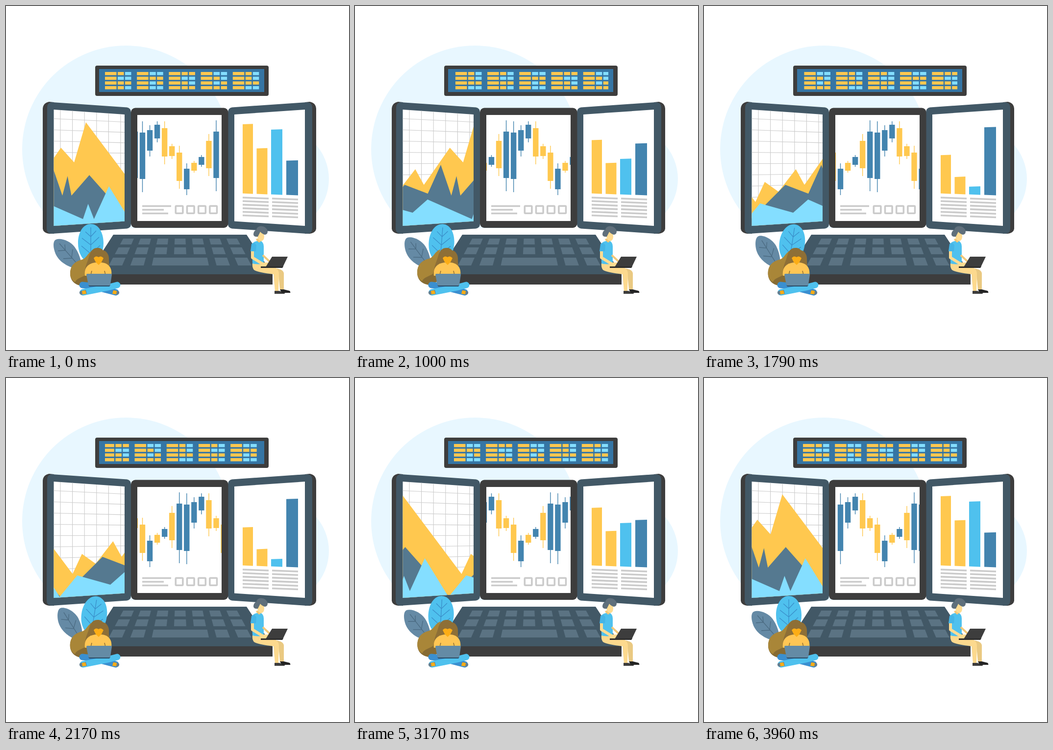
An HTML page that plays this animation: 700 by 704 pixels, repeating every 4 s.

```html
<!DOCTYPE html>
<html lang="en">
<head>
<meta charset="utf-8">
<title>Trading desk</title>
<style>
  html, body { margin: 0; width: 100%; height: 100%; overflow: hidden; background: #fff; }
  svg { display: block; width: 700px; height: 704px; }
</style>
</head>
<body>
<svg viewBox="0 0 700 704" xmlns="http://www.w3.org/2000/svg">
  <defs>
    <clipPath id="tickerClip"><rect x="202" y="130" width="315" height="46"/></clipPath>
    <clipPath id="areaClip"><path d="M97.5 212 242 222V440.5L97.5 450Z"/></clipPath>
    <clipPath id="candleClip"><rect x="268" y="223" width="172" height="217"/></clipPath>
    <clipPath id="backClip"><rect width="700" height="455"/></clipPath>
  </defs>

  <g fill="#e8f7ff" clip-path="url(#backClip)">
    <circle cx="245" cy="293" r="212"/>
    <circle cx="553" cy="354" r="106"/>
  </g>

  <!-- ticker board -->
  <rect x="182" y="122" width="354" height="62" rx="4" fill="#3d3d3d"/>
  <rect x="190" y="129" width="337" height="47" fill="#3575a4"/>
  <g clip-path="url(#tickerClip)"><g id="ticker"></g></g>

  <!-- left monitor -->
  <path d="M75 210Q76 198 88 196L98 197V466L88 466Q76 464 75 456Z" fill="#3d3d3d"/>
  <path d="M84 207Q85 196 95 197L247 207.500Q255 209 255 218V446Q255 454 247 455.500L94 466Q83 466 83 455Z" fill="#425866"/>
  <path d="M97.500 212 242 222V440.500L97.500 450Z" fill="#fff"/>
  <g clip-path="url(#areaClip)">
    <g id="grid" stroke="#cbcbcb" stroke-width="1.100"></g>
    <g id="areas"></g>
  </g>

  <!-- right monitor -->
  <path d="M633 210Q632 198 620 196L610 197V466L620 466Q632 464 633 456Z" fill="#3d3d3d"/>
  <path d="M625 207Q624 196 613 197L461 207.500Q453 209 453 218V446Q453 454 461 455.500L614 466Q625 466 625 455Z" fill="#425866"/>
  <path d="M466 222 610 212V450L466 440.500Z" fill="#fff"/>
  <g id="bars"></g>
  <g id="notes" stroke="#cbcbcb" stroke-width="3.600"></g>

  <!-- centre monitor -->
  <rect x="255" y="208.500" width="198.500" height="245.500" rx="9" fill="#3d3d3d"/>
  <rect x="268" y="223" width="172" height="217" fill="#fff"/>
  <g clip-path="url(#candleClip)"><g id="candles"></g></g>
  <g id="legend" stroke="#cbcbcb" stroke-width="3.600" fill="none">
    <path d="M278 409.500H337M278 417H322M278 424.500H331"/>
  </g>

  <!-- keyboard -->
  <path d="M219 468H491L544 549H167Z" fill="#425866"/>
  <path d="M167 549H544V570H167Z" fill="#3d3d3d"/>
  <g id="keys" fill="#5b7383"></g>

  <!-- leaves -->
  <g id="darkLeaf">
    <path d="M156 540C132 537 110 527 101 507C96 495 95 481 102 478C112 474 131 481 140 493C150 507 154 522 156 540Z" fill="#658aa5"/>
    <path d="M109 486 156 540M121 500 120 488M134 515 136 498M121 500 106 501M135 516 117 517" fill="none" stroke="#4b6b82" stroke-width="1.300"/>
  </g>
  <g id="lightLeaf">
    <path d="M173 530C155 520 147 505 147 485C147 464 157 446 173 446C189 446 199 464 199 485C199 505 191 520 173 530Z" fill="#4fc1ee"/>
    <path d="M173 453V530M173 472 184 460M173 472 162 462M173 489 190 473M173 489 155 475M173 507 192 490M173 507 154 491" fill="none" stroke="#3a8fca" stroke-width="1.300"/>
  </g>

  <!-- seated woman -->
  <g id="hair">
    <path d="M131 548C131 563 142 572 157 573L172 566 166 520C152 524 131 524 131 548Z" fill="#866b33"/>
    <path d="M178 500C166 505 165 516 155 519C139 523 131 532 131 547C131 556 135 562 141 565C145 556 155 556 163 550L172 527Z" fill="#a98638"/>
  </g>
  <path d="M187 495C176 495 172 503 169 514C166 526 159 535 163 548H207C214 540 210 532 210 520C211 507 203 500 198 500C196 497 192 495 187 495Z" fill="#8e6f36"/>
  <path d="M161 552C159 535 168 527 182 525H196C210 527 217 536 215 552Z" fill="#ffc654"/>
  <path d="M173 550 175 542M203 550 201 542" stroke="#8e6f36" stroke-width="1.500"/>
  <path d="M179 516Q183 510 189 514Q194 510 199 516L195 524 189 530 183 524Z" fill="#fcad16"/>
  <g fill="none" stroke-width="13" stroke-linecap="round">
    <path d="M156 571 174 573 224 586" stroke="#3a8fd0"/>
    <path d="M227 571 208 576 157 586" stroke="#4fc1ee"/>
  </g>
  <path d="M163 581 165 589 154 591Q149 590 150 585Q151 583 154 583Z" fill="#657f90"/>
  <path d="M219 581 217 589 227 591Q232 590 231 585Q230 583 227 583Z" fill="#657f90"/>
  <path d="M155 583 162 582 164 589 156 590ZM226 583 219 582 217 589 225 590Z" fill="#fcad16"/>
  <path d="M168 571H213L211 574H170Z" fill="#2b4c66"/>
  <path d="M166 548H214Q216 548 216 550L213 570Q213 572 211 572H170Q168 572 168 570L164 550Q164 548 166 548Z" fill="#648ba5"/>

  <!-- seated man -->
  <path d="M510 477 520 474 522 485 515 487Z" fill="#f2c879"/>
  <path d="M513 462H526L527 473Q526 481 520 481Q513 479 513 470Z" fill="#ffdc92"/>
  <path d="M505 468Q505 460 511 458Q512 451 520 450.500Q532 451 534 461Q534 468 528 468Q522 466 519 462Q517 466 514 472Q506 473 505 468Z" fill="#5f6f7b"/>
  <path d="M516 535 551 537Q566 539 567 547L567 581H559L556 548 516 542Z" fill="#eac982"/>
  <path d="M503 526H526L549 535Q557 539 557 548L556 584H549L546 549Q512 545 506 540Q502 535 503 526Z" fill="#fcd98e"/>
  <path d="M548 583H557L568 585Q570 588 568 589H548Z" fill="#3d3d3d"/>
  <path d="M559 580H567L579 583Q581 586 580 587H563Z" fill="#242424"/>
  <path d="M502 490Q503 482 513 481Q517 487 520 481Q526 484 526 492L526 527Q514 530 503 527Z" fill="#4fc1ee"/>
  <path d="M524 510 538 523" stroke="#f2c879" stroke-width="4"/>
  <path d="M503 499V515L524 528H537" fill="none" stroke="#ffdc92" stroke-width="6" stroke-linejoin="round"/>
  <path d="M501 487Q508 482 511 490L510 502H499Z" fill="#45b5e6"/>
  <path d="M543 513H575L565 534H530Z" fill="#3d3d3d"/>
  <path d="M520 533H566L564 536H520Z" fill="#2d2d2d"/>
</svg>

<script>
const LOOP = 4000, YELLOW = '#ffc84f', BLUE = '#4384af', SKY = '#84deff';
const el = id => document.getElementById(id);

function add(parent, tag, attrs) {
  const node = document.createElementNS('http://www.w3.org/2000/svg', tag);
  for (const name in attrs) node.setAttribute(name, attrs[name]);
  return el(parent).appendChild(node);
}
const line = (parent, x1, y1, x2, y2) => add(parent, 'line', { x1, y1, x2, y2 });
const box = (parent, x, y, width, height, fill) =>
  add(parent, 'rect', { x, y, width, height, fill });

// Ticker: each row gives the colours of the two small cells
const GROUP = 65.2;
const ticker = ['YL LL YY YL', 'LL YY LY LL', 'YY LL YL YY', 'LL YL LY YY', 'YL YL YY LL'];
for (let slot = -5; slot < 5; slot++) {
  const x = 202 + slot * GROUP;
  ticker[(slot + 5) % 5].split(' ').forEach((cells, row) => {
    const y = 135 + row * 9.65;
    box('ticker', x, y, 23.5, 6.5, YELLOW);
    [...cells].forEach((c, i) =>
      box('ticker', x + 26 + i * 15, y, 12.5, 6.5, c === 'Y' ? YELLOW : SKY));
  });
}

// Area chart
for (let i = 0; i < 10; i++) line('grid', 97, 230.5 + i * 23, 243, 237.5 + i * 21.2);
for (let i = 0; i < 6; i++) line('grid', 111 + i * 24.6, 200, 111 + i * 24.6, 455);

const SPAN = 326;
const layers = [
  [YELLOW, [[-41, 401], [-22, 360], [6, 380], [41.5, 334], [59, 366], [112, 290], [139, 320], [163, 238]]],
  ['#557990', [[-64, 450], [20, 366], [67, 384], [93.5, 325], [115, 388], [125.5, 348], [133.5, 388], [170, 346]]],
  [SKY, [[-67.5, 448], [-31.5, 404], [36, 423], [66.5, 396], [157, 436], [167.5, 405], [179.5, 436], [210, 369]]]
];
for (const [fill, pts] of layers) {
  const wave = [-1, 0, 1].flatMap(k => pts.map(([x, y]) => [x + k * SPAN, y]));
  const last = wave[wave.length - 1][0];
  add('areas', 'path', { fill, d: `M${wave[0][0]} 470L${wave.join('L')}L${last} 470Z` });
}

// Candles: body top, body bottom, wick top, wick bottom, rising
const STEP = 15.05;
const candles = [
  [259, 354, 236, 381, 1], [254, 296, 244, 308, 1], [243, 271, 236, 279, 1],
  [250, 308, 236, 324, 0], [287, 307, 282, 313, 0], [300, 358, 286, 374, 0],
  [333, 375, 322, 387, 1], [321, 337, 317, 341, 0], [309, 325, 305, 329, 1],
  [276, 332, 262, 348, 0], [257, 352, 234, 379, 1]
];
for (let slot = -11; slot < 11; slot++) {
  const [top, bottom, high, low, up] = candles[(slot + 11) % 11];
  const x = 278.5 + slot * STEP, fill = up ? BLUE : YELLOW;
  box('candles', x - 0.7, high, 1.4, low - high, fill);
  box('candles', x - 5.7, top, 11.4, bottom - top, fill);
}
for (let i = 0; i < 4; i++)
  add('legend', 'rect', { x: 346.3 + i * 23.2, y: 409.3, width: 14.6, height: 15, rx: 1.5 });

// Bars: left, right, base, top at rest, travel, colour
const bars = [
  [483, 504, 384, 241.5, 65, YELLOW], [511.5, 533.5, 385, 291, 60, YELLOW],
  [541, 564, 386, 252.5, 120, '#4fc1ee'], [572, 596, 387, 316, -70, BLUE]
].map(([l, r, base, top, travel, fill]) =>
  ({ l, r, base, top, travel, node: add('bars', 'path', { fill }) }));
for (let i = 0; i < 6; i++) {
  const y = 392 + i * 7.3;
  line('notes', 483, y, 536, y + 2);
  line('notes', 543, y + 2, 596, y + 4);
}

// Keyboard in perspective
const keyX = (u, y) => 355.5 + u * (1 + 0.00478 * (y - 468));
function key(u1, u2, y1, y2) {
  const pts = [[u1, y1], [u2, y1], [u2, y2], [u1, y2]].map(([u, y]) => [keyX(u, y), y]);
  add('keys', 'path', { d: `M${pts.join('L')}Z` });
}
for (const [y1, y2] of [[476, 488], [494, 508], [515, 531]])
  for (let i = 0; i < 7; i++) {
    const u = -101.5 + i * 33.8;
    if (y1 < 515 || i < 2 || i > 4) key(u - 10.5, u + 10.5, y1, y2);
  }
key(-44.5, 45, 515, 531);

// Motion
const swing = p => 0.5 - 0.5 * Math.cos(2 * Math.PI * p);
const inOut = p => p < 0.5 ? 0.5 * (2 * p) ** 3.5 : 1 - 0.5 * (2 - 2 * p) ** 3.5;
const stepped = (v, pace = 1) => Math.floor(v) + inOut(Math.min(1, (v % 1) * pace));
const move = (id, value) => el(id).setAttribute('transform', value);

function draw() {
  const p = (performance.now() % LOOP) / LOOP;
  const s = swing(p);
  move('ticker', `translate(${stepped(p * 5) * GROUP})`);
  move('areas', `translate(${p * SPAN})`);
  move('candles', `translate(${stepped(p * 11, 1.25) * STEP})`);
  for (const b of bars) {
    const y = b.top + b.travel * s;
    b.node.setAttribute('d', `M${b.l} ${b.base - 0.5}V${y + 0.5}L${b.r} ${y - 0.3}V${b.base + 0.5}Z`);
  }
  move('darkLeaf', `rotate(${9 * s} 155 540)`);
  move('lightLeaf', `rotate(${9 * s} 173 530)`);
  const h = swing(p * 2);
  move('hair', `translate(${-4 * h} ${-2 * h})`);
  requestAnimationFrame(draw);
}
draw();
</script>
</body>
</html>
```
